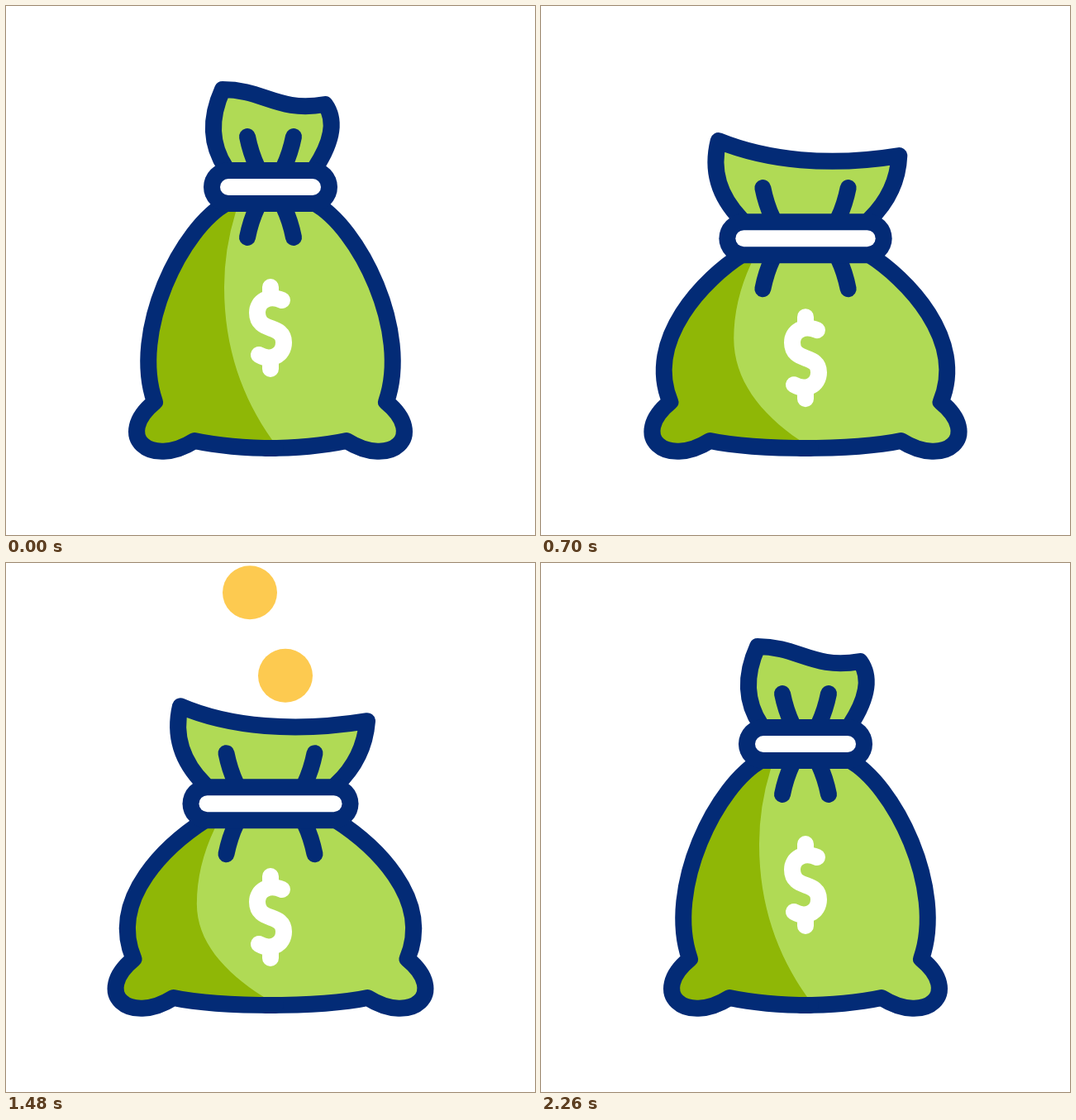
Animation of 640 by 640 pixels, one loop 2.4 s. Source, as an HTML page with a canvas:

```html
<!DOCTYPE html>
<html lang="en">
<head>
<meta charset="utf-8">
<title>Money bag</title>
<style>
html, body { margin: 0; width: 100%; height: 100%; overflow: hidden; background: #fff; }
canvas { display: block; width: 100vmin; height: 100vmin; }
</style>
</head>
<body>
<canvas width="640" height="640"></canvas>
<script>
const ctx = document.querySelector('canvas').getContext('2d');
const NAVY = '#032b76', LIGHT = '#b0da55', DARK = '#8fb706', GOLD = '#fdca50';
const LOOP = 2400, CENTER = 320;
const COINS = 5, FIRST_COIN = 1132, COIN_GAP = 136, FALL = 0.74, RIM = 180;
const COIN_X = [295, 314, 360, 338];

const DOLLAR = new Path2D('M320 340V352M320 427V439M334 356' +
  'C318 349 304 357 304 371C304 396 336 384 336 407C336 423 320 430 306 422');

function ease(t, from, to) {
  const s = Math.min(1, Math.max(0, (t - from) / (to - from)));
  return s * s * (3 - 2 * s);
}

function stroke(path, color = NAVY, width = 20) {
  ctx.strokeStyle = color;
  ctx.lineWidth = width;
  ctx.stroke(path);
}

function fill(path, color) {
  ctx.fillStyle = color;
  ctx.fill(path);
}

// Runs paint for each half, with x measured outward from the centre line
function mirrored(paint) {
  for (const side of [1, -1]) {
    ctx.save();
    ctx.translate(CENTER, 0);
    ctx.scale(side, 1);
    paint(side);
    ctx.restore();
  }
}

function drawCoins(t) {
  for (let i = 0; i < COINS; i++) {
    const y = RIM + (t - FIRST_COIN - i * COIN_GAP) * FALL;
    if (y > 260) continue;
    const coin = new Path2D();
    coin.ellipse(COIN_X[i % COIN_X.length], y, 33, 32.5, 0, 0, 7);
    fill(coin, GOLD);
  }
}

// w widens the bag on each side, drop lowers its neck
function drawBody(w, drop) {
  const half = new Path2D(`M-6 535Q${50 + w} 535 ${92 + w} 526
    C${146 + w} 560 ${190 + w} 520 ${140 + w} 479
    C${170 + 1.06 * w} ${394 + .15 * drop} ${107 + .63 * w} ${267 + drop} ${52 + w} ${238 + drop}
    H-6`);

  const topY = 249 + drop, midX = -56 - 1.3 * w, midY = 340 + drop;
  const shade = new Path2D(`M${-38 - w} ${topY - 20}L${-42 - w} ${topY}
    Q${midX} ${(topY + midY) / 2} ${midX} ${midY}
    C${midX} ${midY + .4 * (525 - midY)} ${-34 - .9 * w} ${474 + .78 * w} ${2 - .4 * w} 525
    l8 12H-230V${topY - 20}`);

  mirrored(() => fill(half, LIGHT));
  mirrored(side => {
    if (side > 0) return;
    ctx.clip(half);
    ctx.scale(-1, 1);
    fill(shade, DARK);
  });
  mirrored(() => stroke(half));
}

function drawNeck(w, drop) {
  ctx.save();
  ctx.translate(0, drop);

  const top = new Path2D(`M${266 - w} 196Q${238 - 1.55 * w} 154 ${262 - 2 * w} 101
    C${312 - 1.65 * w} ${101 + w} ${328 + .86 * w} ${129 + .16 * w} ${386 + 2 * w} 119
    Q${406 + 1.08 * w} ${147 + .67 * w} ${374 + w} 196`);
  fill(top, LIGHT);
  stroke(top);

  const folds = new Path2D(`M${28 + w} 158Q${24 + w} 178 ${16 + w} 195
    M${28 + w} 280Q${24 + w} 260 ${16 + w} 243`);
  mirrored(() => stroke(folds));

  const band = new Path2D(`M${CENTER - 51 - w} 219H${CENTER + 51 + w}`);
  stroke(band, NAVY, 60);
  stroke(band, '#fff', 20);
  ctx.restore();
}

function draw(t) {
  const squash = ease(t, 200, 800) - ease(t, 1733, 2267);
  const sink = 7 * ease(t, 1050, 1700) * squash ** 2;
  const w = 25.5 * squash, drop = 67 * squash + sink;

  ctx.fillStyle = '#fff';
  ctx.fillRect(0, 0, 640, 640);
  ctx.lineCap = ctx.lineJoin = 'round';
  drawCoins(t);
  drawBody(w, drop);
  drawNeck(w, drop);

  ctx.save();
  ctx.translate(0, 39 * squash);
  stroke(DOLLAR, '#fff');
  ctx.restore();
}

const start = performance.now();
function frame() {
  draw((performance.now() - start) % LOOP);
  requestAnimationFrame(frame);
}
frame();
</script>
</body>
</html>
```
